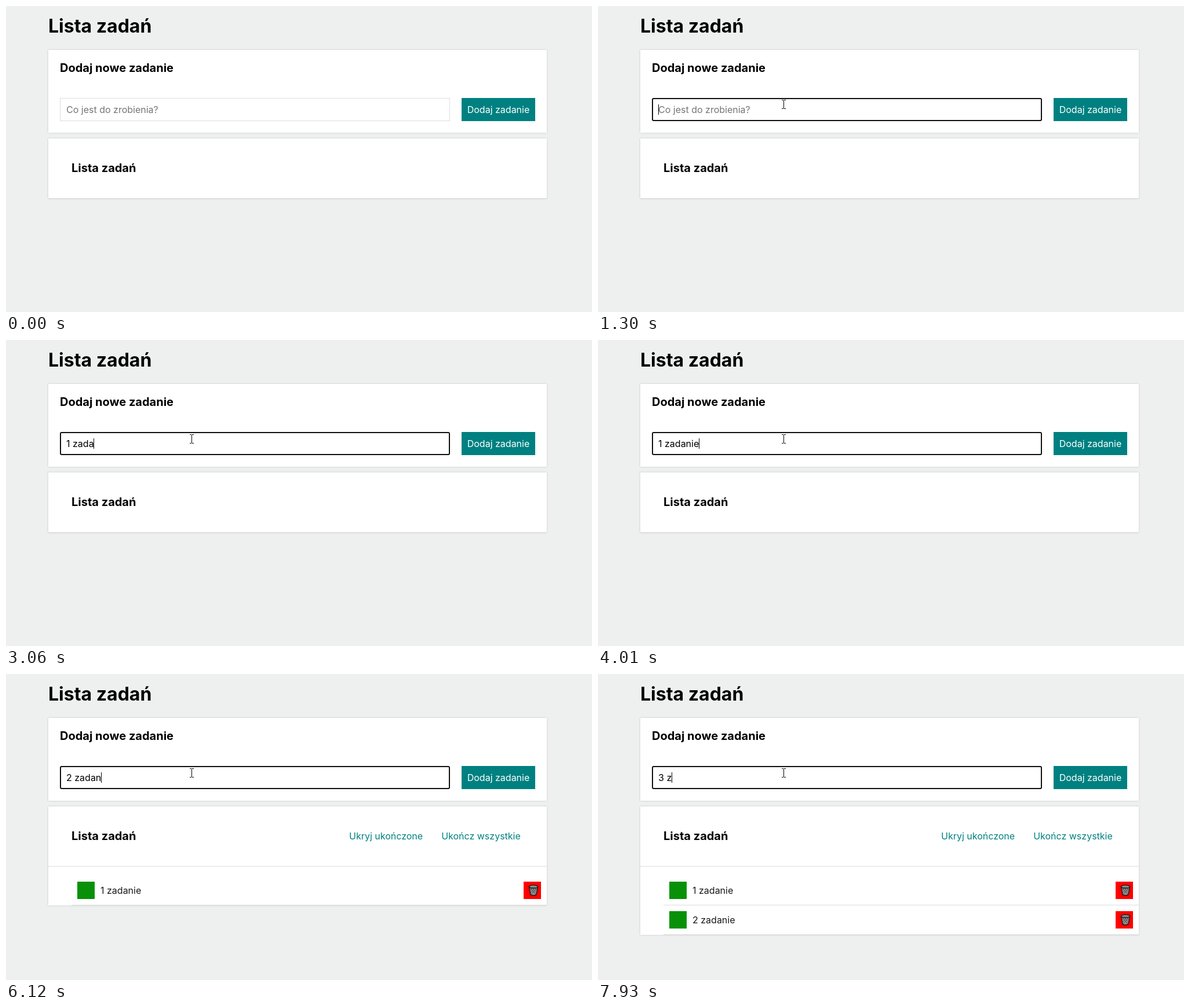
An HTML page that plays this animation: 1011x529 px, repeating every 8 s.

```html
<!DOCTYPE html>
<html lang="pl">
<head>
<meta charset="utf-8">
<title>Lista zadań</title>
<style>
  html, body { margin: 0; width: 100%; height: 100%; overflow: hidden; background: #eef0f0; }
  body { position: relative; font: 16px/20px Inter, sans-serif; color: #000; cursor: default; }
  body *, svg { position: absolute; box-sizing: border-box; }
  h1, h2 { margin: 0; font-weight: 700; white-space: nowrap; }
  h1 { left: 73px; top: 15px; font-size: 32px; line-height: 39px; }
  h2 { font-size: 20px; line-height: 24px; }
  section { left: 73px; width: 860px; background: #fff; box-shadow: 0 0 3px rgba(0, 0, 0, .17); }
  #form { top: 76px; height: 143px; }
  #form h2 { left: 20px; top: 19px; }
  #list { top: 229px; height: 104px; }
  #list h2 { left: 40px; top: 39px; }
  #rule { left: 0; top: 103px; width: 860px; height: 1px; background: #ddd; }
  #field { left: 20px; top: 83px; width: 673px; height: 40px; border: 1px solid #ddd; background: #fff; }
  #field.focus { border: 2px solid #101010; border-radius: 3px; }
  #value, #hint { left: 31px; top: 93px; white-space: pre; }
  #hint { color: #757575; }
  #caret { left: 31px; top: 94px; width: 1px; height: 18px; background: #000; }
  #add { left: 713px; top: 83px; width: 127px; height: 40px; line-height: 40px; background: teal; color: #fff; text-align: center; white-space: nowrap; }
  #links { left: 519px; top: 41px; display: flex; gap: 32px; color: teal; white-space: nowrap; }
  #links span { position: static; }
  .task { left: 40px; width: 820px; height: 51px; border-bottom: 1px solid #ddd; }
  .task i { left: 10px; top: 10px; width: 30px; height: 30px; background: #089108; }
  .task b { left: 780px; top: 10px; width: 30px; height: 30px; background: #f00; }
  .task span { left: 50px; top: 15px; color: #181818; white-space: nowrap; }
  .task svg { left: 8px; top: 5px; }
  #arrow, #beam { left: 0; top: 0; overflow: visible; }
  [hidden] { display: none !important; }
</style>
</head>
<body>
<h1>Lista zadań</h1>
<section id="form">
  <h2>Dodaj nowe zadanie</h2>
  <div id="field"></div>
  <div id="hint">Co jest do zrobienia?</div>
  <div id="value"></div>
  <div id="caret" hidden></div>
  <div id="add">Dodaj zadanie</div>
</section>
<section id="list">
  <h2>Lista zadań</h2>
  <div id="links" hidden><span>Ukryj ukończone</span><span>Ukończ wszystkie</span></div>
  <div id="rule"></div>
</section>
<svg id="arrow" width="13" height="20" hidden>
  <path d="M.5.5V16.5L4.2 13 6.6 18.5 9 17.5 6.7 12H11.7Z" fill="#fff" stroke="#000"/>
</svg>
<svg id="beam" width="7" height="16" hidden>
  <path d="M0 .5H3M4 .5H7M3.5 1V15M0 15.5H3M4 15.5H7" fill="none" stroke="#000"/>
</svg>
<script>
const LOOP = 8000, BLINK = 530, FOCUS = 1300;
const entries = [
  { text: "1 zadanie", keys: [2290, 2420, 2580, 2740, 2900, 3060, 3730, 3870, 4010], enter: 4280 },
  { text: "2 zadanie", keys: [5000, 5270, 5440, 5610, 5780, 5950, 6120, 6520, 6770], enter: 7240 },
  { text: "3 z", keys: [7570, 7750, 7930], enter: Infinity }
];
// pointer hotspot: time, x, y
const path = [[390, 440, 487], [560, 388, 322], [720, 344, 193], [860, 326, 152],
              [960, 323, 147], [1120, 321, 157], [1270, 320, 170], [1400, 320, 171]];
const bin = `<svg width="18" height="20">
  <path d="M1.5 4 4 17.5Q9 20 14 17.5L16.5 4Z" fill="#929292" stroke="#1c1c1c" stroke-width="1.4"/>
  <path d="M4 7 13 17M7 6 14 14M11 6 15 10M14 7 5 17M11 6 4 14M7 6 3 10" stroke="#505050" fill="none"/>
  <ellipse cx="9" cy="3.8" rx="7.5" ry="2.6" fill="#777" stroke="#1c1c1c" stroke-width="1.4"/>
  <path d="M3.5 3.5Q9 1.4 14.5 3.5" stroke="#bbb" fill="none"/></svg>`;

const $ = id => document.getElementById(id);
const [field, hint, value, caret, list, links, arrow, beam] =
  ["field", "hint", "value", "caret", "list", "links", "arrow", "beam"].map($);

const tasks = entries.slice(0, 2).map((entry, i) => {
  const row = document.createElement("div");
  row.className = "task";
  row.style.top = 120 + 51 * i + "px";
  row.innerHTML = `<i></i><span>${entry.text}</span><b>${bin}</b>`;
  return list.appendChild(row);
});

function pointerAt(t) {
  const s = Math.min(1400, 390 + Math.floor((t - 390) / 50) * 50 + 20);
  let i = 1;
  while (i < path.length - 1 && path[i][0] < s) i++;
  const [t0, x0, y0] = path[i - 1], [t1, x1, y1] = path[i];
  const k = Math.min(1, (s - t0) / (t1 - t0));
  return [Math.round(x0 + (x1 - x0) * k), Math.round(y0 + (y1 - y0) * k)];
}

function drawPointer(t) {
  const [x, y] = pointerAt(t);
  const overField = y >= 159 && y < 199 && x < 766 && t > 860;
  arrow.toggleAttribute("hidden", t < 390 || overField);
  beam.toggleAttribute("hidden", t < 390 || !overField);
  arrow.style.transform = `translate(${x}px, ${y}px)`;
  beam.style.transform = `translate(${x - 3}px, ${y - 8}px)`;
}

function draw(t) {
  const current = entries.find(e => t < e.enter);
  const typed = current.text.slice(0, current.keys.filter(k => k <= t).length);
  if (value.textContent !== typed) value.textContent = typed;
  hint.hidden = typed !== "";

  const lastKey = Math.max(FOCUS, ...entries.flatMap(e => e.keys).filter(k => k <= t));
  field.classList.toggle("focus", t >= FOCUS);
  caret.hidden = t < FOCUS || Math.floor((t - lastKey) / BLINK) % 2 === 1;
  caret.style.left = 31 + Math.floor(value.getBoundingClientRect().width) + "px";

  const done = entries.filter(e => e.enter <= t).length;
  tasks.forEach((row, i) => row.hidden = i >= done);
  links.hidden = !done;
  list.style.height = (done ? 120 + 51 * done : 104) + "px";
  drawPointer(t);
}

function tick() {
  draw(performance.now() % LOOP);
  requestAnimationFrame(tick);
}
tick();
</script>
</body>
</html>
```
